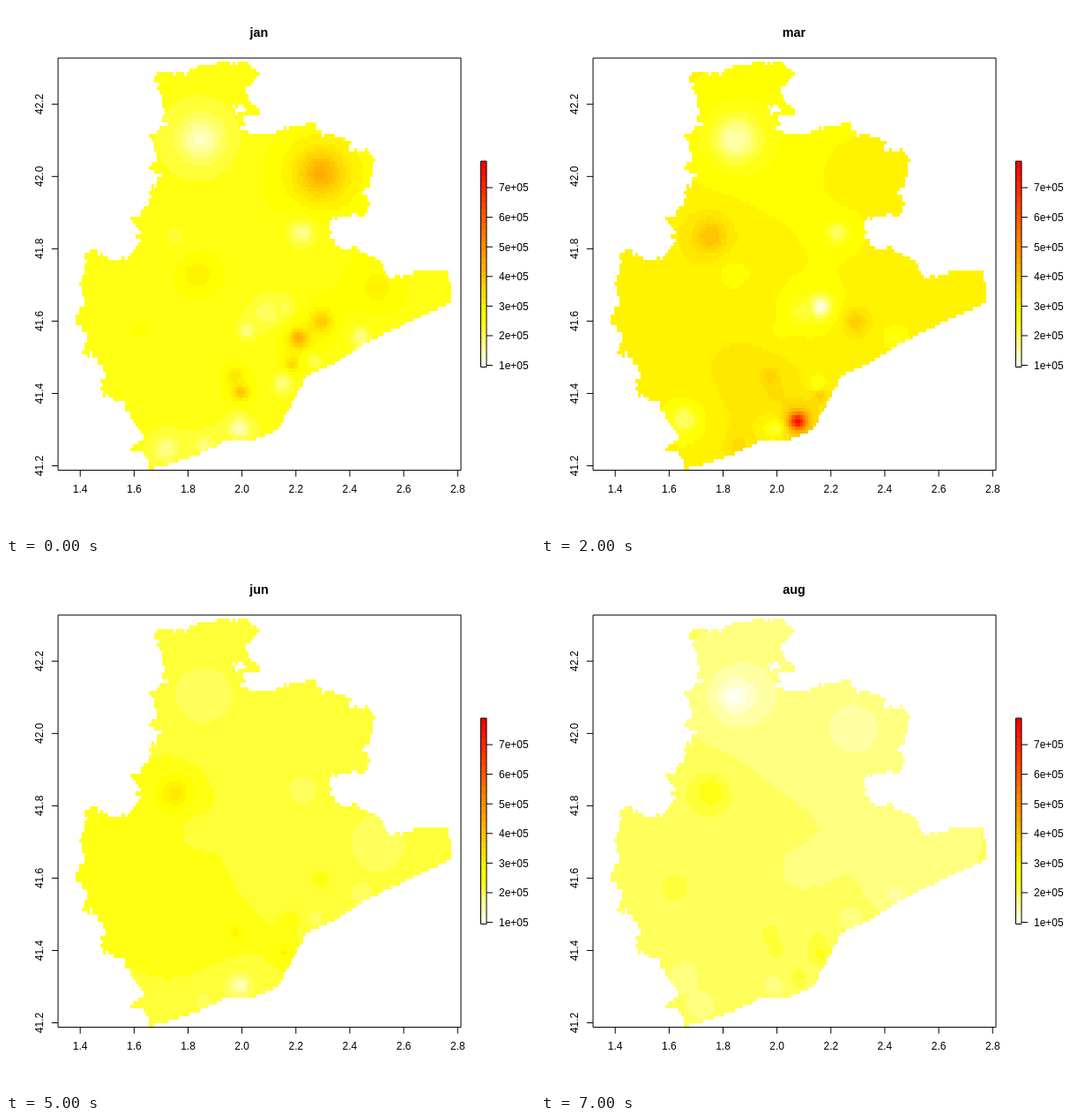
An HTML page with a canvas that plays this animation: 600 by 600 pixels, repeating every 8000 ms.

```html
<!DOCTYPE html>
<html lang="en">
<head>
<meta charset="utf-8">
<title>Monthly map</title>
<style>
  html, body { margin: 0; width: 100%; height: 100%; overflow: hidden; background: #fff; }
  canvas, svg { position: absolute; left: 0; top: 0; width: 600px; height: 600px; }
  text { font: 12px "Liberation Sans", Arial, sans-serif; text-anchor: middle; }
  #title { font-size: 14.4px; font-weight: bold; }
  .key { text-anchor: start; }
  .line { fill: none; stroke: #000; stroke-width: 1; }
</style>
</head>
<body>
<canvas id="map" width="600" height="600"></canvas>
<svg id="axes" viewBox="0 0 600 600"><text id="title" x="287" y="35">jan</text></svg>
<script>
const LEVELS = 30, PALE = 7, STEP = 1000, FALLOFF = 2.5;
const CELL_W = 3.06, CELL_H = 4.1, LEFT = 76.4, TOP = 62.6, COLS = 141, ROWS = 113;

// Reversed heat palette: white to yellow, then yellow to red.
function colour(k) {
  if (k < PALE) return `rgb(255,255,${Math.round(255 * (1 - (k + 0.5) / PALE))})`;
  return `rgb(255,${Math.round(255 * (LEVELS - 1 - k) / (LEVELS - 1 - PALE))},0)`;
}

const outline = new Path2D(`M168,76 200,76 230,66 260,64 284,68 285,82 275,90 275,104 286,112
  286,122 270,126 268,143 300,145 312,138 345,135 362,146 388,148 390,164 412,163 420,178
  411,206 402,212 412,222 411,235 370,239 367,258 376,271 400,274 424,292 432,306 452,305
  464,299 503,301 504,337 451,361 402,386 374,405 341,419 325,450 310,479 282,492 248,493
  227,505 163,526 159,508 138,503 157,490 132,446 109,443 110,415 98,395 83,394 92,376
  79,350 91,335 84,318 91,278 106,279 118,288 144,285 152,255 140,242 164,222 162,206
  178,196 164,184 175,172 164,148 180,138 180,114 172,92Z M258,112h12v9h-12z`);

// Measuring points: x, y and the distance at which their pull is halved.
const stations = {
  A: [221, 151, 24], B: [357, 190, 26], C: [336, 257, 12], D: [192, 261, 18], E: [218, 304, 18],
  F: [420, 319, 20], G: [295, 348, 15], H: [273, 368, 8], I: [317, 341, 12], J: [357, 358, 12],
  K: [332, 377, 10], L: [325, 406, 8], M: [402, 376, 10], N: [260, 420, 8], O: [266, 438, 8],
  P: [265, 479, 11], Q: [291, 471, 9], R: [314, 428, 9], S: [316, 442, 9], T: [152, 368, 11],
  V: [162, 470, 15], W: [182, 502, 13], X: [225, 499, 10], Y: [350, 403, 9]
};

// Broad swells of the background: x, y, radius.
const regions = {
  north: [300, 140, 130], west: [150, 350, 85], south: [235, 425, 70], east: [430, 320, 100]
};

const months = [
  { name: 'jan', base: 6.6, swell: {},
    at: { A: 1.7, B: 14.4, C: 2.8, D: 5.9, E: 8.8, F: 8.6, G: 4, H: 3, I: 4.8, J: 12, K: 14.5,
      L: 11, M: 3.2, N: 10, O: 13, P: 1.8, R: 3, T: 7.2, W: 3, X: 3.5, Y: 4.8 } },
  { name: 'feb', base: 4.4, swell: { west: 1, south: 0.9, east: 1 },
    at: { A: 2.9, B: 3.5, C: 0.3, D: 6.6, F: 6.5, G: 2.2, H: 3, I: 3, J: 6.8, K: 6.3, L: 6.3,
      M: 3.3, N: 6.3, O: 6.8, P: 1.5, Q: 12.5, R: 2.3, S: 6.1 } },
  { name: 'mar', base: 8.6, swell: { north: -1, south: 0.8 },
    at: { A: 2, B: 9, C: 4.2, D: 13, E: 7.5, G: 5.5, H: 7, I: 0.5, J: 12, M: 6, N: 12, O: 11,
      P: 5.5, Q: 29, R: 6, S: 11.5, V: 4, X: 11 } },
  { name: 'apr', base: 6.5, swell: { north: -0.8, south: 0.4 },
    at: { A: 2.5, C: 3.5, D: 9, E: 5, G: 5, J: 9, M: 5, N: 9, P: 3.5, Q: 14, S: 8.5, V: 4 } },
  { name: 'may', base: 4.5, swell: { north: -1 },
    at: { A: 0.8, C: 1.9, D: 5.7, E: 2.2, G: 6, K: 6.6, L: 5.8, N: 6.6, O: 5.9, P: 0.8, Q: 6.3,
      S: 6.8, T: 6, V: 2.2, W: 3, Y: 3.2 } },
  { name: 'jun', base: 5.8, swell: { north: -0.5, west: 0.9, south: 0.4, east: -0.6 },
    at: { A: 4, C: 4.3, D: 9.3, E: 5.5, F: 4.3, G: 5.2, I: 5, J: 6.5, L: 7.2, M: 4.3, N: 8.3,
      P: 1.8, S: 8.2, X: 4.3, Y: 4.2 } },
  { name: 'jul', base: 4.5, swell: { north: -1 },
    at: { A: 1.5, C: 2.5, D: 6.3, E: 3.4, G: 3, M: 3, N: 6, P: 2.5, S: 6.5, Y: 3.2 } },
  { name: 'aug', base: 4.6, swell: { north: -1.2, east: -0.9 },
    at: { A: 0.5, B: 2.3, D: 6.8, G: 3, I: 3.3, M: 2.5, N: 5.9, O: 5.6, P: 3.3, Q: 5.6, R: 5.4,
      S: 6.5, T: 5.9, V: 3.3, W: 3.2, Y: 3.2 } }
];

// Inverse-distance weighting of the stations over the swelling background.
function valueAt({ base, swell, at }, x, y) {
  let sum = base, weights = 1;
  for (const id in swell) {
    const [rx, ry, size] = regions[id];
    sum += swell[id] * Math.exp(-((x - rx) ** 2 + (y - ry) ** 2) / size ** 2);
  }
  for (const id in at) {
    const [sx, sy, reach] = stations[id];
    const w = (reach / (Math.hypot(x - sx, y - sy) + 0.1)) ** FALLOFF;
    sum += w * at[id];
    weights += w;
  }
  return sum / weights;
}

let seed = 7;
const random = () => (seed = seed * 16807 % 2147483647) / 2147483647;
const jitter = n => Array.from({ length: n }, () => (random() - 0.5) * 6);

const screen = document.getElementById('map').getContext('2d');
const rowShift = jitter(ROWS), colShift = jitter(COLS);
const edgeX = col => Math.round(LEFT + col * CELL_W);
const edgeY = row => Math.round(TOP + row * CELL_H);

// Cells inside the outline; land borders are ragged, the coast is smooth.
const cells = [];
for (let row = 0; row < ROWS; row++) {
  for (let col = 0; col < COLS; col++) {
    const x = LEFT + (col + 0.5) * CELL_W, y = TOP + (row + 0.5) * CELL_H;
    const rough = y < 560 - 0.55 * x ? 1 : 0;
    if (!screen.isPointInPath(outline, x + rough * rowShift[row], y + rough * colShift[col], 'evenodd')) continue;
    const left = edgeX(col), top = edgeY(row);
    cells.push({ x, y, left, top, w: edgeX(col + 1) - left, h: edgeY(row + 1) - top });
  }
}

function renderMap(month) {
  const canvas = document.createElement('canvas');
  canvas.width = canvas.height = 600;
  const ctx = canvas.getContext('2d');
  for (const c of cells) {
    const level = Math.floor(valueAt(month, c.x, c.y));
    ctx.fillStyle = colour(Math.max(0, Math.min(LEVELS - 1, level)));
    ctx.fillRect(c.left, c.top, c.w, c.h);
  }
  return canvas;
}

const axes = document.getElementById('axes');
function add(tag, attrs, label) {
  const el = document.createElementNS('http://www.w3.org/2000/svg', tag);
  for (const k in attrs) el.setAttribute(k, attrs[k]);
  if (label) el.textContent = label;
  axes.appendChild(el);
}
const line = d => add('path', { d, class: 'line' });

function drawAxes() {
  line('M59.04 59.04H516V526.56H59.04Z');
  for (let i = 0; i < 8; i++) {
    const x = 84.2 + i * 61.15;
    line(`M${x} 526.56v7.2`);
    add('text', { x, y: 552 }, (1.4 + i * 0.2).toFixed(1));
  }
  for (let i = 0; i < 6; i++) {
    const y = 521.5 - i * 82.04;
    line(`M59.04 ${y}h-7.2`);
    add('text', { transform: `translate(42 ${y}) rotate(-90)` }, (41.2 + i * 0.2).toFixed(1));
  }
  const keyY = k => Math.round(409.5 - k * 233.5 / LEVELS);
  for (let k = 0; k < LEVELS; k++) {
    add('rect', { x: 538, y: keyY(k + 1), width: 7, height: keyY(k) - keyY(k + 1), fill: colour(k) });
  }
  line('M538.5 176H545V409.5H538.5Z');
  for (let i = 1; i < 8; i++) {
    const y = 441.1 - i * 33.58;
    line(`M545 ${y}h7`);
    add('text', { x: 559, y: y + 4.3, class: 'key' }, `${i}e+05`);
  }
}

drawAxes();
const maps = months.map(renderMap);
const title = document.getElementById('title');
let shown = -1;

function tick() {
  const i = Math.floor(performance.now() / STEP) % months.length;
  if (i !== shown) {
    shown = i;
    title.textContent = months[i].name;
    screen.clearRect(0, 0, 600, 600);
    screen.drawImage(maps[i], 0, 0);
  }
  requestAnimationFrame(tick);
}
tick();
</script>
</body>
</html>
```
